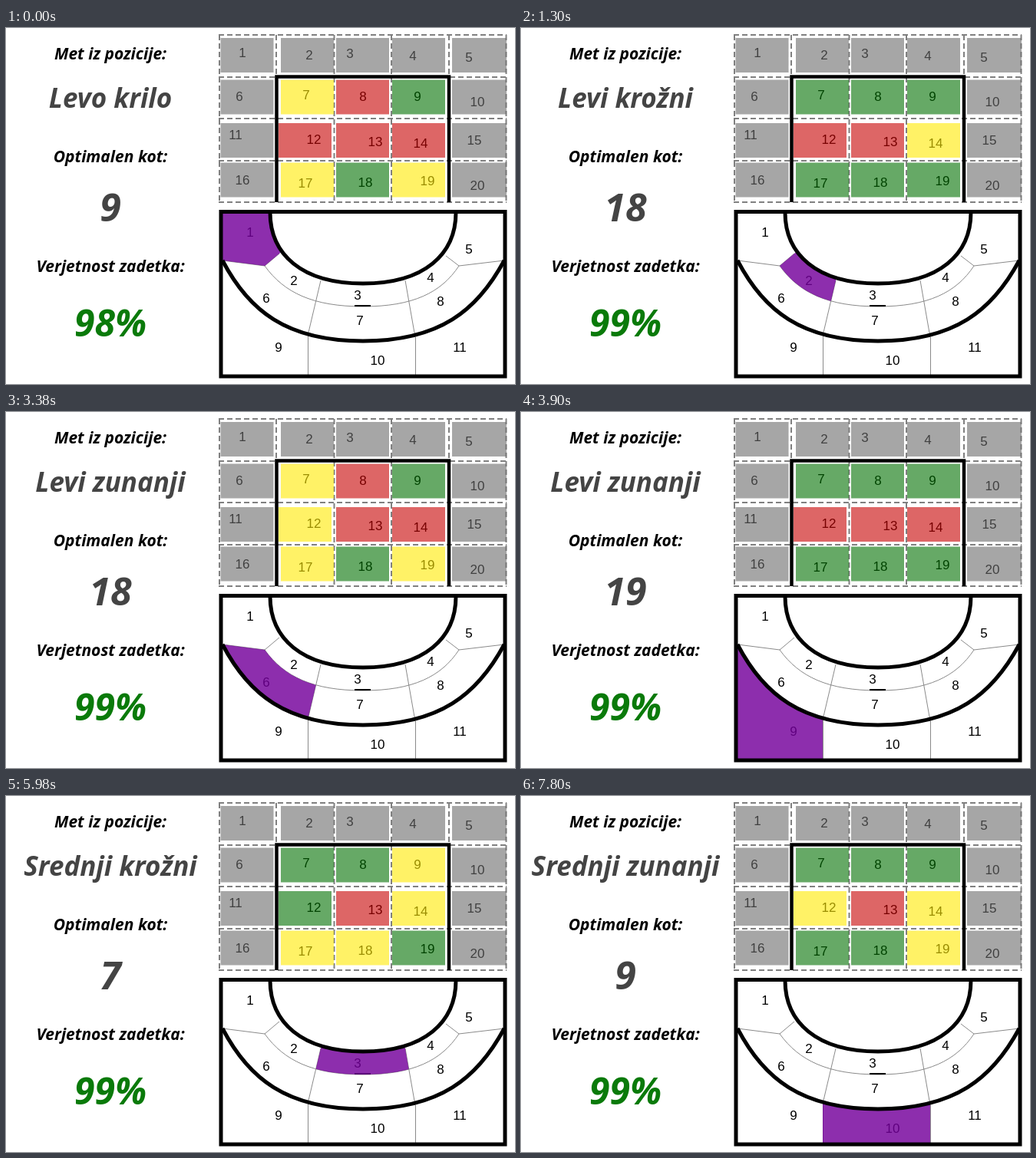
Recreate the animation shown at these times as an HTML page with a canvas. Size 663 px wide and 464 px high, loop 8 s.

```html
<!DOCTYPE html>
<html lang="sl">
<head>
<meta charset="utf-8">
<style>
  html, body { margin: 0; width: 100%; height: 100%; overflow: hidden; background: #fff; }
  canvas { display: block; }
</style>
</head>
<body>
<canvas id="stage" width="663" height="464"></canvas>
<script>
(() => {
const ctx = document.getElementById('stage').getContext('2d');
const SCENE_MS = 1300, LOOP_MS = 8000;

// goal: shades of cells 7-9, 12-14 and 17-19
const scenes = [
  { position: 'Levo krilo',      angle: 9,  chance: 98, zone: 1,  goal: 'yrgrrrygy' },
  { position: 'Levi krožni',     angle: 18, chance: 99, zone: 2,  goal: 'gggrryggg' },
  { position: 'Levi zunanji',    angle: 18, chance: 99, zone: 6,  goal: 'yrgyrrygy' },
  { position: 'Levi zunanji',    angle: 19, chance: 99, zone: 9,  goal: 'gggrrrggg' },
  { position: 'Srednji krožni',  angle: 7,  chance: 99, zone: 3,  goal: 'ggygryyyg' },
  { position: 'Srednji zunanji', angle: 9,  chance: 74, zone: 7,  goal: 'yyyyryyyy' },
  { position: 'Srednji zunanji', angle: 9,  chance: 99, zone: 10, goal: 'gggyryggy' }
];

const shades = {
  r: 'rgba(198,0,0,.6)', g: 'rgba(0,113,0,.6)',
  y: 'rgba(255,234,0,.6)', n: 'rgba(107,107,107,.6)'
};
const columns = [279.5, 358, 430, 503, 581], rows = [13, 67.5, 124, 175.5];
const cellLabels = [
  [308, 32], [395, 35], [448, 33], [530, 36], [603, 38],
  [304, 89], [391, 87], [465, 89], [536, 89], [614, 96],
  [299, 139], [401, 145], [481, 148], [540, 150], [610, 146],
  [308, 198], [390, 202], [468, 201], [549, 199], [614, 205]
];
const zoneLabels = [
  [318, 266], [375, 329], [458, 348], [553, 325], [603, 288], [339, 352],
  [461, 381], [566, 356], [355, 416], [484, 433], [591, 416]
];

const innerArc = 'M344 240C344 295 385 333 465 333C545 333 586 295 586 240';
const middleCurve = 'C362 345 400 363 465 363C530 363 567 345 590 310';
const middleArc = 'M282 303L337 310' + middleCurve + 'L649 303';
const outerArc = 'M282 303C316 368 365 408 465 408C565 408 614 368 649 303';
const closeAbove = 'V240H282Z';
const court = 'M280 240H650V454H280Z';

const bands = {
  near: new Path2D(middleArc + closeAbove + innerArc + 'Z'),
  far: new Path2D(outerArc + closeAbove + middleArc + closeAbove),
  back: new Path2D(court + outerArc + closeAbove)
};
const centre = 'M416.6 301H515L535 415H389.7Z';
const zones = {
  1: ['near', 'M280 238H375V278L337 310H280Z'],
  2: ['near', 'M337 310L375 278L416.6 301L399 376H320Z'],
  3: ['near', centre],
  6: ['far', 'M280 300L416.6 301L389.7 415H280Z'],
  7: ['far', centre],
  9: ['back', 'M280 300H393V455H280Z'],
  10: ['back', 'M393 300H533V455H393Z']
};

function stroke(path, color, width, dash = []) {
  ctx.strokeStyle = color;
  ctx.lineWidth = width;
  ctx.setLineDash(dash);
  ctx.stroke(new Path2D(path));
}

function numbers(points) {
  ctx.font = '17px "Liberation Sans", Arial, sans-serif';
  ctx.fillStyle = '#000';
  points.forEach(([x, y], i) => ctx.fillText(i + 1, x, y + 6));
}

function caption(text, y, size, color) {
  ctx.font = `italic bold ${size}px "Open Sans", "Noto Sans", sans-serif`;
  ctx.fillStyle = color;
  ctx.fillText(text, 136, y);
}

function drawCaptions({ position, angle, chance }) {
  caption('Met iz pozicije:', 41, 21, '#000');
  caption(position, 104, 35, '#444');
  caption('Optimalen kot:', 175, 21, '#000');
  caption(angle, 252, 50, '#444');
  caption('Verjetnost zadetka:', 318, 21, '#000');
  caption(chance + '%', 402, 48, chance < 90 ? '#ffea00' : '#0a7a0a');
}

function drawGoal({ goal }) {
  numbers(cellLabels);
  stroke('M277 9H652M277 64H352M578 64H652M277 118H652M277 173H652M277 227H652' +
    'M278 9V227M352 9V62M427.5 9V227M502 9V227M577 9V62M651.5 9V227', '#808080', 2, [7, 4]);
  rows.forEach((y, row) => columns.forEach((x, col) => {
    const inside = row > 0 && col > 0 && col < 4;
    const shift = row === 2 && col === 1 ? -3 : 0;
    ctx.fillStyle = shades[inside ? goal[(row - 1) * 3 + col - 1] : 'n'];
    ctx.fillRect(x + shift, y, col === 4 ? 71 : 69, 45);
  }));
  stroke('M352.5 227V63.5H577V227', '#000', 4.5);
}

function drawCourt({ zone }) {
  stroke(middleArc + 'M337 310L356 294M590 310L573 297M410 329L393 401' +
    'M520 329L533 403M393.5 401V454M533.5 403V454', '#8a8a8a', 1);
  stroke('M454 362H475', '#000', 2);
  numbers(zoneLabels);

  const [band, wedge] = zones[zone];
  ctx.save();
  ctx.clip(bands[band], 'evenodd');
  ctx.fillStyle = 'rgba(117,0,156,.82)';
  ctx.fill(new Path2D(wedge));
  ctx.restore();

  stroke(innerArc + outerArc, '#000', 5);
  stroke('M280 239.5H650V454H280Z', '#000', 5);
}

function draw(time) {
  const scene = scenes[Math.floor((time % LOOP_MS) / SCENE_MS)];
  ctx.fillStyle = '#fff';
  ctx.fillRect(0, 0, 663, 464);
  ctx.textAlign = 'center';
  drawCaptions(scene);
  drawGoal(scene);
  drawCourt(scene);
}

const start = performance.now();
function tick() {
  draw(performance.now() - start);
  requestAnimationFrame(tick);
}
tick();
})();
</script>
</body>
</html>
```
